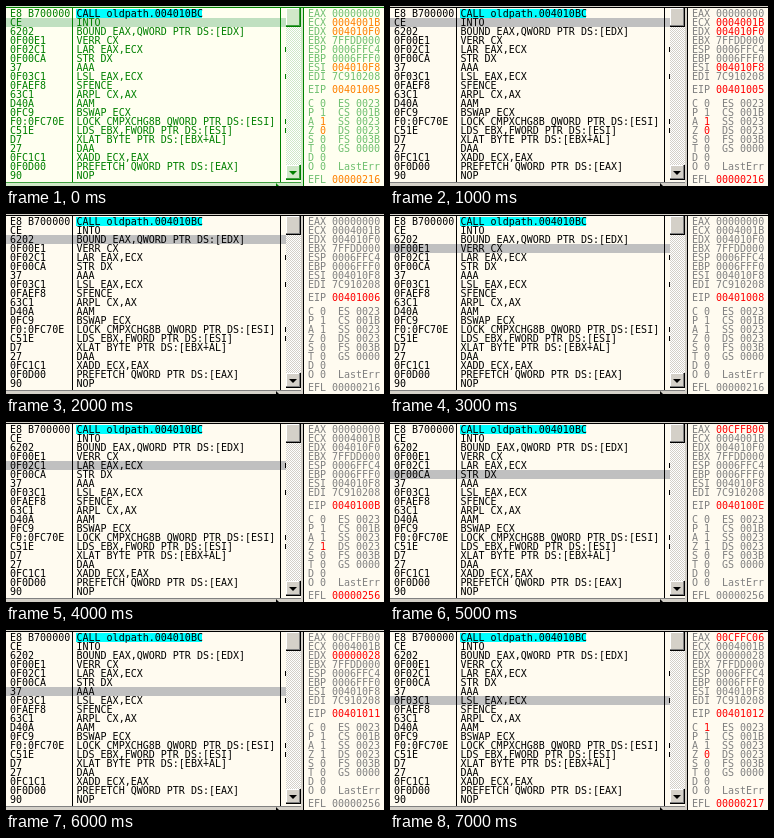
Animation, 378 px wide and 180 px high, one loop 8 s. Source, as an HTML page:

```html
<!DOCTYPE html>
<html lang="en">
<head>
<meta charset="utf-8">
<title>Debugger stepping</title>
<style>
html, body { margin: 0; width: 100%; height: 100%; overflow: hidden; }
svg {
  --bg: #fffbf0; --ink: #000; --dim: #808080; --hot: #f00;
  --sel: #c0c0c0; --face: #d4d0c8; --edge: #808080;
  display: block; width: 378px; height: 180px; background: var(--bg);
}
svg.tint {
  --bg: #fffff0; --ink: #008000; --dim: #70c070; --hot: #ff8000;
  --sel: #c0e0c0; --face: #d0e8c8; --edge: #40a040;
}
rect { shape-rendering: crispEdges; }
text { font: 10px "DejaVu Sans Mono", monospace; white-space: pre; fill: var(--ink); }
.call { fill: #000; }
.reg { fill: var(--dim); }
.hot { fill: var(--hot); }
</style>
</head>
<body>
<svg id="stage" viewBox="0 0 378 180">
  <pattern id="track" width="2" height="2" patternUnits="userSpaceOnUse">
    <rect width="2" height="2" fill="#fff"/>
    <rect width="1" height="1" fill="var(--face)"/>
    <rect x="1" y="1" width="1" height="1" fill="var(--face)"/>
  </pattern>
</svg>
<script>
const LINE = 9, TOP = 3, STEP = 1000;
const stage = document.getElementById("stage");

const code = `E8 B700000|CALL oldpath.004010BC
CE|INTO
6202|BOUND EAX,QWORD PTR DS:[EDX]
0F00E1|VERR CX
0F02C1|LAR EAX,ECX
0F00CA|STR DX
37|AAA
0F03C1|LSL EAX,ECX
0FAEF8|SFENCE
63C1|ARPL CX,AX
D40A|AAM
0FC9|BSWAP ECX
F0:0FC70E|LOCK CMPXCHG8B QWORD PTR DS:[ESI]
C51E|LDS EBX,FWORD PTR DS:[ESI]
D7|XLAT BYTE PTR DS:[EBX+AL]
27|DAA
0FC1C1|XADD ECX,EAX
0F0D00|PREFETCH QWORD PTR DS:[EAX]
90|NOP`.split("\n").map(row => row.split("|"));

const start = {
  EAX: "00000000", ECX: "0004001B", EDX: "004010F0", EBX: "7FFDD000",
  ESP: "0006FFC4", EBP: "0006FFF0", ESI: "004010F8", EDI: "7C910208",
  EIP: "00401005", C: "0", P: "1", A: "1", Z: "0", S: "0", T: "0", D: "0", O: "0",
  EFL: "00000216"
};
const segments = {
  C: "ES 0023", P: "CS 001B", A: "SS 0023", Z: "DS 0023",
  S: "FS 003B", T: "GS 0000", O: "LastErr"
};

// Selected line and the registers each step changes
const { ECX, EDX, ESI, EIP, A, Z, EFL } = start;
const first = { ECX, EDX, ESI, EIP, A, Z, EFL };
const steps = [
  [1, first],
  [1, first],
  [2, { EIP: "00401006" }],
  [3, { EIP: "00401008" }],
  [4, { EIP: "0040100B", Z: "1", EFL: "00000256" }],
  [5, { EIP: "0040100E", EAX: "00CFFB00" }],
  [6, { EIP: "00401011", EDX: "00000028" }],
  [7, { EIP: "00401012", EAX: "00CFFC06", C: "1", Z: "0", EFL: "00000217" }]
];
const states = [];
steps.forEach(([, changes], i) => states.push({ ...(states[i - 1] || start), ...changes }));

function add(tag, attrs, content = "") {
  const node = document.createElementNS("http://www.w3.org/2000/svg", tag);
  for (const key in attrs) node.setAttribute(key, attrs[key]);
  node.textContent = content;
  return stage.appendChild(node);
}
const box = (x, y, width, height, fill) => add("rect", { x, y, width, height, fill });
const label = (x, y, content, cls = "") => add("text", { x, y, class: cls }, content);
function button(x, y, w, h) {
  box(x, y, w, h, "var(--ink)");
  box(x, y, w - 1, h - 1, "var(--edge)");
  box(x, y, w - 2, h - 2, "#fff");
  box(x + 1, y + 1, w - 3, h - 3, "var(--face)");
}

const bar = box(0, TOP, 280, LINE, "var(--sel)");
box(70, TOP, 126, LINE, "#0ff");
for (const x of [66, 274]) box(x, 2, 1, 174, "var(--ink)");
code.forEach(([bytes, command], i) => {
  const y = TOP + i * LINE + 8;
  label(4, y, bytes);
  label(70.5, y, command, i ? "" : "call");
});
// Comments cut off by the scroll bar
for (const row of [4, 7, 12, 13]) box(279, TOP + row * LINE + 2, 1, 5, "var(--ink)");

// Scroll bars and pane borders
box(0, 176, 297, 4, "var(--face)");
box(0, 176, 297, 1, "var(--edge)");
add("path", { d: "M270 177v3h3z", fill: "var(--ink)" });
box(280, 2, 15, 172, "url(#track)");
button(280, 2, 15, 19);
button(280, 159, 15, 15);
add("path", { d: "M283 165h8l-4 4z", fill: "var(--ink)" });
box(295, 0, 2, 180, "var(--face)");
box(297, 0, 1, 180, "var(--ink)");
box(0, 0, 378, 1, "var(--face)");
box(0, 1, 378, 1, "var(--ink)");

const values = {};
Object.keys(start).forEach((name, i) => {
  const gap = (i > 7) + (i > 8) + (i > 16);
  const y = 11 + Math.floor((i + gap / 2) * LINE);
  label(302, y, name, "reg");
  values[name] = label(name.length > 1 ? 326 : 314, y, "", "reg");
  if (segments[name]) label(332, y, segments[name], "reg");
});

let shown = -1;
function show(i) {
  if (i === shown) return;
  shown = i;
  const [line, changes] = steps[i];
  stage.classList.toggle("tint", i === 0);
  bar.setAttribute("y", TOP + line * LINE);
  for (const name in values) {
    values[name].textContent = states[i][name];
    values[name].setAttribute("class", name in changes ? "hot" : "reg");
  }
}

const origin = performance.now();
function tick() {
  show(Math.floor((performance.now() - origin) / STEP) % steps.length);
  requestAnimationFrame(tick);
}
tick();
</script>
</body>
</html>
```
